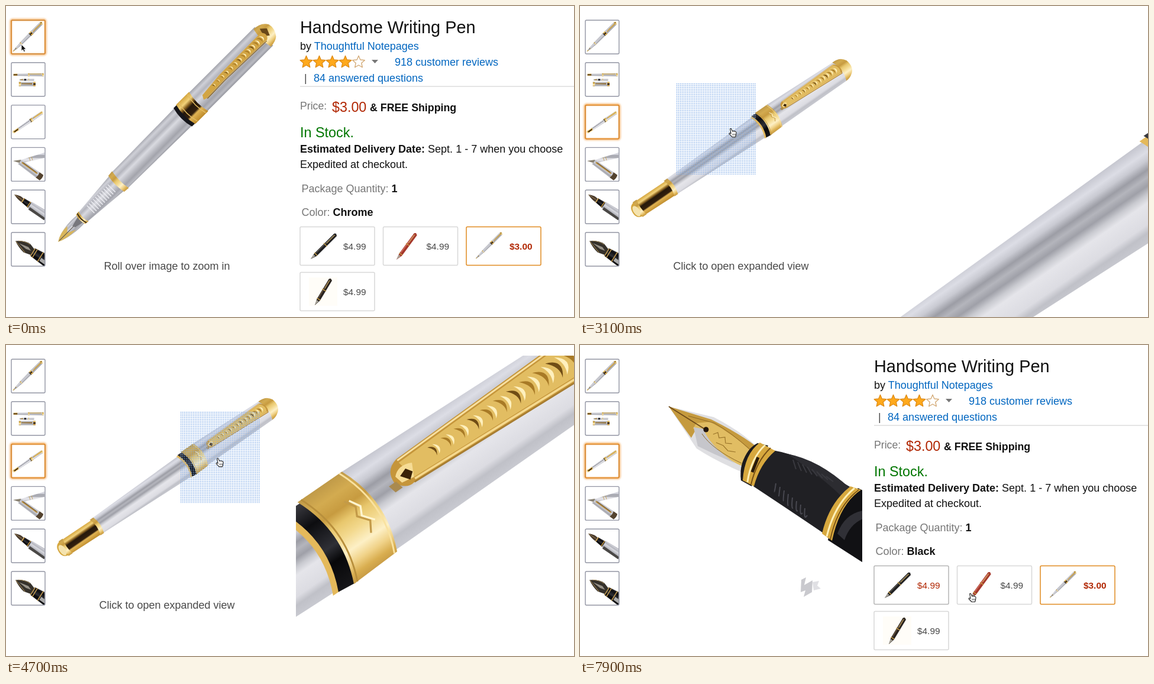
Recreate the animation shown at these times as an HTML page. Size 960 px wide and 526 px high, loop 8 s.

```html
<!DOCTYPE html>
<html lang="en">
<head>
<meta charset="utf-8">
<title>Product page zoom</title>
<style>
html, body { margin: 0; width: 100%; height: 100%; overflow: hidden; background: #fff; }
#stage { display: block; width: 960px; height: 526px; font-family: "Liberation Sans", Arial, sans-serif; font-size: 18px; fill: #111; }
.link { fill: #0066c0; }
.red { fill: #b12704; }
.gray { fill: #767676; }
.dark { fill: #484848; }
.bold { font-weight: bold; }
.price { font-size: 15.4px; }
</style>
</head>
<body>
<svg id="stage" viewBox="0 0 960 526" xmlns="http://www.w3.org/2000/svg"></svg>
<script>
const LOOP = 8000, ZOOM = 3.65, LENS_W = 135, LENS_H = 154, LENS_LAG = 45;
const stage = document.getElementById('stage');

const gradient = (id, stops) => `<linearGradient id="${id}" x1="0" y1="0" x2="0" y2="1">${
  stops.map(([at, color]) => `<stop offset="${at}" stop-color="${color}"/>`).join('')}</linearGradient>`;
const path = (d, fill, extra = '') => `<path d="${d}" fill="${fill}" ${extra}/>`;
const stroke = (d, color, width, extra = '') => path(d, 'none', `stroke="${color}" stroke-width="${width}" ${extra}`);
const text = (x, y, content, cls = '', extra = '') => `<text x="${x}" y="${y}" class="${cls}" ${extra}>${content}</text>`;

// A slice of a tube lying along x, with curved ends
function tube(x0, x1, top0, bottom0, top1, bottom1, bulge, fill) {
  const mid0 = (top0 + bottom0) / 2, mid1 = (top1 + bottom1) / 2;
  return path(`M${x0} ${top0}L${x1} ${top1}Q${x1 + 2 * bulge} ${mid1} ${x1} ${bottom1}L${x0} ${bottom0}Q${x0 + 2 * bulge} ${mid0} ${x0} ${top0}Z`, fill);
}

// Engraved leaves along a clip: a shaded crescent and a highlight each
function engraving(from, to, y0, y1, size) {
  let out = '';
  const count = 12;
  for (let i = 0; i < count; i++) {
    const k = i / (count - 1), x = from + (to - from) * k, y = y0 + (y1 - y0) * k, r = size * (.5 + .5 * k);
    out += path(`M${x - r * .4} ${y - r}Q${x + r * 1.3} ${y - r * .4} ${x + r * .2} ${y + r}Q${x + r * .6} ${y} ${x - r * .4} ${y - r}Z`, i % 3 ? '#a87a26' : '#6f4c15');
    out += path(`M${x + r * .6} ${y - r}Q${x + r * 2} ${y} ${x + r * .7} ${y + r}Q${x + r * 1.2} ${y} ${x + r * .6} ${y - r}Z`, '#fff0bd');
  }
  return out;
}

function openPen() {
  let ribs = '';
  for (let x = 78; x < 130; x += 5) ribs += stroke(`M${x} -9v18`, '#f0f0f5', 1.4);
  return `<g transform="translate(88 399) rotate(-45)">
    ${path('M0 0Q22 -13 57 -9V9Q24 11 0 0Z', 'url(#steel)')}
    ${path('M0 0Q14 -9 30 -8L22 0L36 7Q14 7 0 0Z', '#d9b65c')}
    ${stroke('M3 0H40', '#55504a', 1)}
    ${path('M36 -2L57 -7V7L38 3Z', '#77777d')}
    ${tube(60, 143, -11, 11, -18, 18, -2, 'url(#steel)')}${ribs}
    ${tube(54, 61, -11, 11, -12, 12, -2, 'url(#gold)')}
    ${tube(56, 58, -11, 11, -11, 11, -2, '#3b2a10')}
    ${tube(146, 302, -19, 19, -21, 21, -2, 'url(#steel)')}
    ${tube(139, 149, -19, 19, -20, 20, -2, 'url(#gold)')}
    ${tube(330, 492, -22, 22, -22, 22, -2, 'url(#steel)')}
    ${tube(298, 306, -22, 22, -22, 22, -3, '#16161a')}
    ${tube(305, 336, -23, 23, -23, 23, -3, 'url(#darkgold)')}
    ${stroke('M311 -22Q305 0 311 22M331 -22Q325 0 331 22', '#e3bd63', 1.5)}
    ${path('M488 -21Q506 -20 512 -8Q515 4 506 15Q500 20 488 21Q483 0 488 -21Z', 'url(#gold)')}
    ${path('M496 -14L505 -6L500 6L492 0Z', '#684819')}
    ${path('M344 4L348 -3L392 -7L492 -8Q501 0 492 8L392 5L350 6Z', '#d2a544')}
    ${stroke('M350 7L392 6L490 9', '#86601d', 1.2)}${engraving(372, 482, -1, 0, 6)}
  </g>`;
}

function closedPen() {
  return `<g transform="translate(92 347) rotate(-34.6)">
    ${tube(74, 253, -14, 17, -18, 23, 4, 'url(#silver)')}
    ${tube(6, 75, -13, 15, -12, 17, 2, 'url(#darkgold)')}
    ${tube(70, 77, -14, 18, -14, 18, 3, 'url(#gold)')}
    ${tube(6, 14, -14, 16, -14, 16, -2, 'url(#gold)')}
    ${path('M8 -13Q-4 -12 -4 2Q-4 13 7 15Q1 0 8 -13Z', '#d5a73f')}
    <ellipse cx="3" cy="2" rx="5" ry="10" fill="#f4e3ae"/>
    ${tube(286, 421, -21, 23, -16.5, 22, 4, 'url(#silver)')}
    ${path('M418 -17Q434 -18 440 -6Q444 10 434 17Q428 22 420 22Q428 3 418 -17Z', 'url(#gold)')}
    ${tube(251, 255, -19, 24, -19, 24, 5, '#e4b95b')}
    ${tube(254, 263, -20, 24, -20, 25, 5, 'url(#black)')}
    ${tube(262, 287, -21, 25, -21, 24, 5, 'url(#gold)')}
    ${stroke('M264 -21Q274 2 264 25', '#b88f3c', .8)}${stroke('M285.5 -21Q295.5 2 285.5 24', '#f9e2a0', .8)}
    ${stroke('M280 -9l3 5l-2 4l4 5l-3 5', '#c39a48', .9)}${stroke('M282 -8l3 5l-2 4l4 5', '#fff5d0', .9)}
    ${path('M304 -3Q304 -10 311 -11.5L417 -14Q428 -4 422 7.5L312 2Q307 3 304 -3Z', '#c5953a')}
    ${path('M311 -9.5L417 -12Q425 -3 420 5L313 0Z', '#e2bd62')}
    ${stroke('M311 -10.7L417 -13', '#f8e0a0', .8)}
    ${stroke('M313 .8L421 6', '#f5d98e', 1)}${stroke('M312 2L422 7.5', '#a67c30', .7)}
    ${engraving(327, 410, -5, -3.5, 5.5)}
    ${path('M306 -5Q310 -9 316 -6L313 0L307 -1Z', '#f6dc95')}
    ${path('M308 -4l4 -1.5l2 3l-3 2.5Z', '#3b2308')}
    ${path('M301 -3l4 0l1 4l-4 0Z', '#a98a50')}
  </g>`;
}

function penParts() {
  return `<g transform="translate(95 160)">
    ${tube(0, 372, -12, 12, -19, 19, 1, 'url(#steel)')}
    ${tube(0, 48, -12, 12, -13, 13, 1, 'url(#darkgold)')}${tube(180, 198, -18, 18, -18, 18, 1, 'url(#gold)')}
    ${tube(352, 374, -18, 18, -15, 15, 2, 'url(#gold)')}${tube(200, 345, -14, -4, -14, -4, 0, '#c0a05a')}
  </g><g transform="translate(170 221)">
    ${tube(0, 180, -9, 9, -12, 12, 1, 'url(#steel)')}${path('M0 0L42 -10V10Z', '#a78748')}
    ${tube(56, 82, -11, 11, -11, 11, 1, '#25252b')}${tube(108, 118, -11, 11, -11, 11, 1, 'url(#gold)')}
  </g><g transform="translate(162 275)">
    ${tube(0, 205, -25, 25, -25, 25, 1, 'url(#steel)')}${tube(0, 24, -25, 25, -25, 25, 1, 'url(#gold)')}
    ${tube(177, 205, -25, 25, -25, 25, 1, 'url(#darkgold)')}${tube(30, 165, -12, 2, -13, 6, 0, '#937440')}
  </g>`;
}

function blackNib() {
  let grips = '';
  for (let i = 0; i < 8; i++) {
    grips += stroke(`M${331 + i * 7} ${234 + i * 6}q-2 ${15 + i} ${-3 + i} ${20 - Math.abs(i - 3) * 2}`, '#484850', 2);
    grips += stroke(`M${360 + i * 8} ${194 + i * 4}l${5 + i} ${16 - i}`, '#39393f', 2);
  }
  return `${path('M150 104L226 122Q271 145 299 172L274 215Q229 196 197 175Z', '#dfdfe2')}
    ${path('M150 104L222 126Q270 150 297 171L288 190Q246 148 217 136L202 132L188 157Z', '#c59a3e')}
    ${path('M197 132L220 130Q263 153 291 182L279 207Q242 193 218 161Q210 149 191 141Z', '#e1bd63')}
    ${path('M192 139L209 142Q217 168 262 200L226 184L199 171Z', '#c6c6cb')}
    ${stroke('M150 104L212 143', '#6d4a19', 1.7)}
    ${stroke('M183 120L227 132Q254 147 289 178M206 150Q224 177 273 200', '#8e6926', 1)}
    ${stroke('M225 151l8 -3l2 9l10 -1l1 10l11 1m-27 -2l12 5l8 9l13 2', '#9b752a', 1.2)}
    <circle cx="213" cy="143" r="4.5" fill="#23150b"/>
    ${path('M300 166Q283 174 274 200Q270 214 272 229L290 239L318 170Z', '#1c1a1c')}
    ${path('M326 178Q384 188 438 229L463 244Q434 260 414 320Q367 288 293 239Q302 197 326 178Z', '#202024')}
    ${path('M350 184Q404 194 456 242L441 255Q406 221 350 184Z', '#2c2c31')}${grips}
    ${path('M304 165L330 179Q304 201 294 239L275 229Q278 184 304 165Z', '#d7a83e')}
    ${stroke('M313 169Q289 191 283 232', '#fff0b8', 3)}
    ${stroke('M322 174Q298 197 289 236', '#775016', 2)}
    ${stroke('M301 190l-10 25', '#281a0c', 5)}
    ${path('M470 242L478 246V368L419 330Q433 265 470 242Z', '#111114')}
    ${path('M478 280Q447 286 435 319L447 330Q456 303 478 294Z', '#303036')}
    ${path('M457 239L475 245Q439 269 426 331L409 319Q421 267 457 239Z', '#d7a83e')}
    ${stroke('M464 242Q430 270 417 324', '#fff0b8', 3)}
    ${stroke('M471 245Q435 272 423 329', '#6b4612', 1.5)}
    ${path('M374 397l8 -4l-3 13l14 -8l-1 20l-14 8l3 -11l-8 3Z', '#c9c9ce')}
    ${path('M393 401l11 -2l-3 8l6 5l-12 3Z', '#e0e0e4')}`;
}

// A small pen between two points
function miniPen(x0, y0, x1, y1, color, shine) {
  const length = Math.hypot(x1 - x0, y1 - y0), angle = Math.atan2(y1 - y0, x1 - x0) * 180 / Math.PI;
  return `<g transform="translate(${x0} ${y0}) rotate(${angle})">
    ${path(`M0 0L11 -2.5H${length - 2}L${length} 0L${length - 2} 3.5H11Z`, color)}
    ${path('M0 0L9 -2V2Z', '#a9a59a')}
    ${stroke(`M14 -1H${length - 5}`, shine, 1)}
    ${stroke(`M12 -3V3.5M${length * .57} -3.5V4`, '#c49b47', 1.5)}
    ${stroke(`M${length * .62} 0H${length - 3}`, '#c8a65d', 1)}
  </g>`;
}

const thumbArt = [
  '', '', '',
  `${path('M2 22L13 21L55 8V17L15 26Z', 'url(#silver)')}${path('M2 22L15 20V26Z', '#8a8272')}
   ${stroke('M29 16l2 6M33 15l2 6', '#c5a565', 1)}
   <g transform="translate(13 23) rotate(36)">${tube(0, 46, -4, 5, -5, 6, 1, 'url(#steel)')}
   ${stroke('M4 -1H36', '#b58d42', 2.5)}${stroke('M6 -2H34', '#5a4426', .8)}${tube(38, 46, -5, 6, -5, 6, 1, '#54432f')}</g>`,
  `<g transform="translate(4 7) rotate(34)">${path('M0 0Q10 -5 17 -3V4Q9 4 0 0Z', '#493b2c')}${stroke('M1 0H16', '#a5875a', .8)}
   ${tube(17, 33, -4, 4, -5, 6, 1, 'url(#black)')}${tube(31, 66, -6, 6, -8, 8, 1, 'url(#steel)')}
   ${stroke('M18 -4V4M30 -5V6', '#c99739', 1.5)}${path('M34 3L66 4V8H34Z', '#4a4846')}</g>`,
  `<g transform="translate(6 14) rotate(32)">${path('M0 0Q14 -10 24 -9L35 -5V6L22 9Q11 7 0 0Z', '#35312b')}
   ${path('M7 0L24 -3L31 0L22 2Z', '#99948a')}${stroke('M1 0L24 8M4 -3Q15 -9 24 -8', '#a98a52', .9)}
   ${tube(34, 66, -7, 8, -10, 11, 1, 'url(#black)')}${stroke('M35 -7V8M39 -8V9M50 -9V10', '#c29a50', 1.6)}
   ${path('M52 1L68 2V8L52 7Z', '#aaa')}</g>`
];

const pictures = ['openPen', 'penParts', 'closedPen'];
const thumbTop = i => 24 + i * 71.8;

function thumb(i) {
  const art = i < 3
    ? `<svg x="10.5" y="${thumbTop(i) + 1}" width="55" height="55" viewBox="80 18 401 401"><use href="#${pictures[i]}"/></svg>`
    : `<svg x="10" y="${thumbTop(i) + .5}" width="55.5" height="56">${thumbArt[i]}</svg>`;
  return `${art}<rect x="9" y="${thumbTop(i)}" width="57" height="57" rx="2" fill="none" stroke="#9295a3" stroke-width="1.4"/>`;
}

function star(x, full) {
  let d = '';
  for (let i = 0; i < 10; i++) {
    const r = i % 2 ? 5 : 10.8, a = i * Math.PI / 5 - Math.PI / 2;
    d += `${i ? 'L' : 'M'}${(x + r * Math.cos(a)).toFixed(1)} ${(95 + r * Math.sin(a)).toFixed(1)}`;
  }
  return path(d + 'Z', full ? '#ffa91c' : '#fff', `stroke="${full ? '#de8b16' : '#d2a873'}" stroke-width="1.3" stroke-linejoin="round"`);
}

function swatch(id, x, y, price, art, chosen) {
  return `<rect id="${id}" x="${x}" y="${y}" width="126" height="65" rx="2" fill="#fff" stroke="${chosen ? '#e08a20' : '#d8d8d8'}" stroke-width="1.5"/>
    ${art}${text(x + 73, y + 38, price, 'price ' + (chosen ? 'bold red' : 'dark'), `id="${id}Price"`)}`;
}

const silverSwatch = '<svg x="793" y="381" width="49" height="49" viewBox="80 18 401 401"><use href="#openPen"/></svg>';

stage.innerHTML = `<defs>
  ${gradient('silver', [[0, '#c4c5ce'], [.12, '#dcdde5'], [.2, '#c9cad2'], [.29, '#9c9da5'], [.36, '#b4b5bc'], [.44, '#9fa0a8'], [.52, '#c9cad0'], [.6, '#e5e5ea'], [.8, '#dcdce2'], [.88, '#c0c1c8'], [1, '#c9cad1']])}
  ${gradient('steel', [[0, '#a5a6ae'], [.15, '#cfd0d7'], [.3, '#b4b5bd'], [.45, '#d9dae0'], [.62, '#bcbdc4'], [.78, '#a3a4ac'], [.9, '#b9bac1'], [1, '#96979f']])}
  ${gradient('gold', [[0, '#c09a48'], [.15, '#d3ab50'], [.3, '#c79b40'], [.42, '#e8c76d'], [.55, '#f3d98e'], [.7, '#fdf0c6'], [.82, '#f0d288'], [.92, '#d9ae50'], [1, '#c79b45']])}
  ${gradient('darkgold', [[0, '#d3a43e'], [.2, '#f2d27a'], [.32, '#8c6422'], [.42, '#25180b'], [.66, '#33200d'], [.74, '#e1b454'], [1, '#bd8a2a']])}
  ${gradient('black', [[0, '#3a3a40'], [.25, '#0d0d10'], [.55, '#2f3036'], [.7, '#08080a'], [1, '#17171a']])}
  <pattern id="dots" width="3" height="3" patternUnits="userSpaceOnUse"><rect width="1.5" height="1.5" fill="#7fabe8"/></pattern>
  <filter id="blur" x="-20%" y="-20%" width="140%" height="140%"><feGaussianBlur stdDeviation="1.5"/></filter>
  <clipPath id="imageClip"><rect x="80" y="18" width="397" height="412"/></clipPath>
  <clipPath id="zoomClip"><rect x="490" y="18" width="470" height="508"/></clipPath>
  <g id="openPen">${openPen()}</g><g id="penParts">${penParts()}</g>
  <g id="closedPen">${closedPen()}</g><g id="blackNib">${blackNib()}</g>
</defs>
<rect width="960" height="526" fill="#fff"/>
<rect id="glow" x="8" width="59" height="59" rx="3" fill="none" stroke="#f5b26a" stroke-width="3" filter="url(#blur)"/>
${[0, 1, 2, 3, 4, 5].map(thumb).join('')}
<rect id="ring" x="9" width="57" height="57" rx="2" fill="none" stroke="#e58a24" stroke-width="1.6"/>
<g clip-path="url(#imageClip)"><use id="photo"/></g>
${text(272, 446, '', 'dark', 'id="caption" text-anchor="middle"')}
<g id="details">
  ${text(497, 46, 'Handsome Writing Pen', '', 'font-size="28.9"')}
  ${text(497, 74, 'by <tspan class="link">Thoughtful Notepages</tspan>')}
  ${[507.5, 529.5, 551.5, 573.5, 596].map((x, i) => star(x, i < 4)).join('')}
  ${path('M618 91H629L623.5 97Z', '#777')}
  ${text(657, 101, '918 customer reviews', 'link')}
  ${text(504, 128, '|', 'dark')}${text(520, 128, '84 answered questions', 'link')}
  ${stroke('M497 136H960', '#dcdcdc', 1.4)}
  ${text(497, 175, 'Price:', 'gray', 'font-size="17.7"')}
  ${text(551, 179, '$3.00', 'red', 'font-size="23.3"')}
  ${text(615, 178, '&amp; FREE Shipping', 'bold', 'font-size="17.8"')}
  ${text(497, 222, 'In Stock.', '', 'font-size="23.4" style="fill:#007600"')}
  ${text(497, 248, '<tspan class="bold">Estimated Delivery Date:</tspan> Sept. 1 - 7 when you choose')}
  ${text(497, 274, 'Expedited at checkout.')}
  ${text(499.5, 315, '<tspan class="gray">Package Quantity:</tspan> <tspan class="bold">1</tspan>')}
  ${text(499.5, 355, '<tspan class="gray">Color:</tspan> <tspan id="color" class="bold"></tspan>')}
  ${swatch('blackSwatch', 497, 373.5, '$4.99', miniPen(515, 428, 558, 385, '#202022', '#6e6a62'))}
  ${swatch('redSwatch', 637.5, 373.5, '$4.99', miniPen(660, 429, 693, 384, '#a5372b', '#df8170'))}
  ${swatch('silverSwatch', 778, 373.5, '$3.00', silverSwatch, true)}
  ${swatch('darkSwatch', 497, 450.5, '$4.99', '<rect x="512" y="459" width="48" height="48" fill="#fffdf8"/>' + miniPen(522, 506, 549, 461, '#29231f', '#81684a'))}
</g>
<g id="zoom">
  <g clip-path="url(#zoomClip)"><use id="zoomed" href="#closedPen"/></g>
  <rect id="lens" width="${LENS_W}" height="${LENS_H}" fill="url(#dots)"/>
</g>
<g id="arrow">${path('M0 0V11L2.6 8.7L4.4 12.5L6.4 11.6L4.7 8H8Z', '#111', 'stroke="#fff" stroke-width=".8"')}</g>
<g id="hand">${path('M-1.5 0Q0 -1.5 1 .5L2.5 4Q4 2.8 5 4Q6.5 3 7.3 4.6Q9 4.3 9 6.2L8.5 10L7.5 13.5H2L-2.8 8.5Q-3.4 6.7 -1.5 7L0 8Z', '#fff', 'stroke="#222" stroke-width="1.1" stroke-linejoin="round"')}${stroke('M3 8v3M5 8v3M7 8v3', '#222', .7)}</g>`;

const $ = id => document.getElementById(id);
const set = (id, attributes) => Object.entries(attributes).forEach(([name, value]) => $(id).setAttribute(name, value));
const show = (id, visible) => set(id, { visibility: visible ? 'visible' : 'hidden' });
const clamp = (value, low, high) => Math.min(high, Math.max(low, value));

// Pointer route: time, x, y
const route = [
  [0, 26, 65], [900, 27, 68], [1400, 30, 118], [1750, 31, 165], [2000, 29, 196], [2600, 29, 198],
  [2800, 88, 203], [3100, 255, 208], [3850, 362, 172], [4000, 390, 168], [4300, 396, 166],
  [5000, 330, 212], [5300, 313, 221], [5600, 312, 224], [6000, 478, 252], [6400, 563, 285],
  [6550, 565, 290], [7050, 558, 385], [7500, 562, 408], [7900, 660, 421], [8000, 664, 421]
];

function pointer(t) {
  const i = Math.max(1, route.findIndex(([time]) => time >= t));
  const [t0, x0, y0] = route[i - 1], [t1, x1, y1] = route[i], k = clamp((t - t0) / (t1 - t0), 0, 1);
  return [x0 + (x1 - x0) * k, y0 + (y1 - y0) * k];
}

function render(t) {
  const [x, y] = pointer(t);
  const selected = t < 1300 ? 0 : t < 1800 ? 1 : 2;
  const zooming = t >= 2800 && t < 6000;
  const black = t >= 7100;
  const isHand = t >= 900 && t < 6000 || t >= 7000;

  set('ring', { y: thumbTop(selected) });
  set('glow', { y: thumbTop(selected) - 1 });
  set('photo', { href: '#' + (black ? 'blackNib' : pictures[selected]) });
  $('caption').textContent = black ? '' : zooming ? 'Click to open expanded view' : 'Roll over image to zoom in';
  $('color').textContent = black ? 'Black' : 'Chrome';
  set('blackSwatch', { stroke: black ? '#b5b5b5' : '#d8d8d8' });
  set('blackSwatchPrice', { class: 'price ' + (black ? 'red' : 'dark') });

  show('details', !zooming);
  show('zoom', zooming);
  const [aimX, aimY] = pointer(t - LENS_LAG);
  const left = Math.round(clamp(aimX - LENS_W / 2, 80, 477 - LENS_W));
  const top = Math.round(clamp(aimY + 1 - LENS_H / 2, 18, 430 - LENS_H));
  set('lens', { transform: `translate(${left} ${top})` });
  set('zoomed', { transform: `translate(${490 - left * ZOOM} ${18 - top * ZOOM}) scale(${ZOOM})` });

  show('arrow', !isHand);
  show('hand', isHand);
  set(isHand ? 'hand' : 'arrow', { transform: `translate(${x} ${y})` });
}

const start = performance.now();
function frame() {
  render((performance.now() - start) % LOOP);
  requestAnimationFrame(frame);
}
render(0);
requestAnimationFrame(frame);
</script>
</body>
</html>
```
